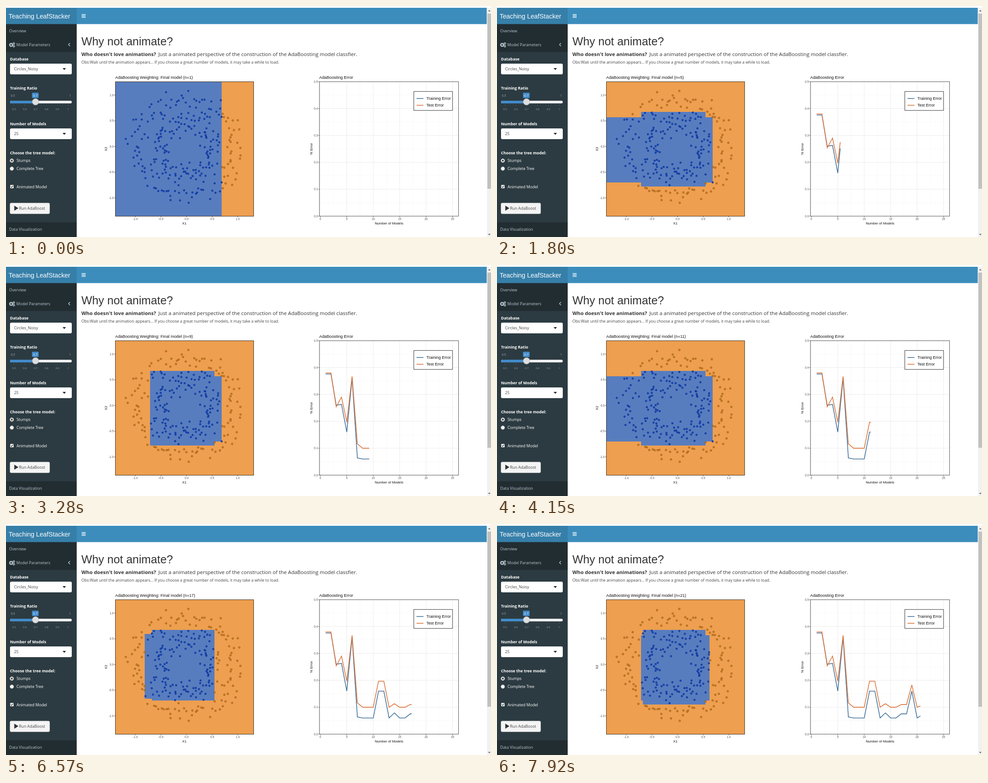
Write an HTML page that moves like this. It is 1084x517 px and loops after 8000 ms.

```html
<!DOCTYPE html>
<html lang="en">
<head>
<meta charset="utf-8">
<title>Boosting dashboard</title>
<style>
html, body { margin: 0; width: 100%; height: 100%; overflow: hidden; background: #fff; }
svg { display: block; width: 100vw; height: 100vh; }
text { font-family: "Open Sans", "Noto Sans", sans-serif; white-space: pre; }
.h { font-family: "Liberation Sans", Arial, sans-serif; }
</style>
</head>
<body>
<svg id="stage" viewBox="0 0 1084 517"></svg>
<script>
const stage = document.getElementById('stage');
const parts = [];
const add = s => parts.push(s);
const rect = (x, y, w, h, fill, more = '') =>
  add(`<rect x="${x}" y="${y}" width="${w}" height="${h}" fill="${fill}" ${more}/>`);
const path = (d, fill, more = '') => add(`<path d="${d}" fill="${fill}" ${more}/>`);
const line = (x1, y1, x2, y2, color, width = 1) =>
  path(`M${x1} ${y1}L${x2} ${y2}`, 'none', `stroke="${color}" stroke-width="${width}"`);
const circle = (x, y, r, fill, more = '') =>
  add(`<circle cx="${x}" cy="${y}" r="${r}" fill="${fill}" ${more}/>`);
const text = (x, y, size, fill, s, more = '') =>
  add(`<text x="${x}" y="${y}" font-size="${size}" fill="${fill}" ${more}>${s}</text>`);
const bold = 'font-weight="700"', sans = ' class="h"';
const middle = 'text-anchor="middle"', end = 'text-anchor="end"';

// Page frame
rect(0, 4, 158, 37, '#367fa9');
rect(158, 4, 916.5, 36.5, '#3c8dbc');
text(6, 27.5, 14.3, '#fff', 'Teaching LeafStacker', sans);
for (let i = 0; i < 3; i++) rect(169, 18.5 + i * 3.1, 9, 1.5, '#fff');
rect(1075, 4, 9, 513, '#f1f1f1');
rect(1076, 17, 8, 392, '#c1c1c1');
path('M1077.5 12l2.7-3 2.7 3z', '#606060');
path('M1077.5 510l2.7 3 2.7-3z', '#606060');

// Sidebar
rect(0, 40.5, 158, 476.5, '#222d32');
rect(0, 103, 158, 381, '#2c3b41');
const pale = '#b8c7ce', size = 8.85;
text(7, 59, size, pale, 'Overview');
text(23, 90, size, pale, 'Model Parameters');
text(7, 502.5, size, pale, 'Data Visualization');
const gear = (x, y, r) => {
  circle(x, y, r, 'none', `stroke="${pale}" stroke-width="${r * .75}"`);
  circle(x, y, r * 1.4, 'none', `stroke="${pale}" stroke-dasharray="${r * .55}"`);
};
gear(11.4, 87, 3);
gear(17.5, 84, 1.7);
gear(17.5, 90, 1.7);
path('M143 83l-3.4 3.5 3.4 3.5', 'none', `stroke="${pale}" stroke-width="1.4"`);

const label = (y, s) => text(9, y, 8.75, '#fff', s, bold);
const select = (y, s) => {
  rect(9, y, 138, 24, '#fff', 'rx="3"');
  text(18, y + 15.3, size, '#444', s);
  path(`M126.5 ${y + 10}h7.5l-3.75 4.2z`, '#222');
};
label(121.5, 'Database');
select(129, 'Circles_Noisy');
label(186.5, 'Training Ratio');
label(266.5, 'Number of Models');
select(274, '25');
label(331.5, 'Choose the tree model:');

text(11, 202.5, 6.2, '#b0b8bb', '0.5');
text(145, 202.5, 6.2, '#b0b8bb', '1', end);
rect(58, 194, 15, 12, '#428bca', 'rx="2"');
text(65.5, 202.7, 6.8, '#fff', '0.7', middle);
rect(9, 212, 138, 6, '#eeeef0', 'rx="3"');
rect(9, 212, 57, 6, '#428bca', 'rx="3"');
for (let i = 0; i <= 20; i++) {
  const x = 18 + i * 6.05;
  line(x, 220, x, i % 4 ? 221.5 : 223.5, '#66747a', .6);
  if (i % 4 === 0) text(x, 232.5, 5.8, '#9aa5a9', +(.5 + i / 40).toFixed(1), middle);
}
circle(66, 214.5, 7.3, '#dedede', 'stroke="#aaa" stroke-width=".6"');

const radio = (y, s) => {
  circle(13, y, 4.3, '#f1f1f1', 'stroke="#8d9598" stroke-width=".7"');
  text(23.5, y + 3.2, size, '#fff', s);
};
radio(346, 'Stumps');
circle(13, 346, 2.3, '#555');
radio(364, 'Complete Tree');
rect(9.5, 400.5, 7.5, 7.5, '#fff', 'rx="1"');
path('M11 404.3l1.8 1.9 3-4', 'none', 'stroke="#333" stroke-width="1.3"');
text(23.5, 407.5, size, '#fff', 'Animated Model');
rect(9, 441, 88.5, 24, '#f4f4f4', 'rx="2.5" stroke="#ddd" stroke-width=".7"');
path('M18.5 446.8l9.2 5.7-9.2 5.7z', '#333');
text(29, 456, size, '#444', 'Run AdaBoost');

// Heading
text(168.5, 88, 25.4, '#333', 'Why not animate?', sans);
text(168.5, 111.5, 11.2, '#333', "Who doesn't love animations?", bold);
text(340.5, 111.5, 11.5, '#333',
  'Just a animated perspective of the construction of the AdaBoosting model classfier.');
text(168.5, 129, 8.87, '#444',
  'Obs:Wait until the animation appears... If you choose a great number of models, it may take a while to load.');

// Model plot
const L = 244, T = 169, R = 554, B = 471, tick = '#4d4d4d';
add('<text id="title" class="h" x="244" y="163.3" font-size="9.28" fill="#111"></text>');
rect(L, T, R - L, B - T, '#ee9f4f');
add('<path id="area" fill="#587dbf" shape-rendering="crispEdges"/>');
rect(L + .5, T + .5, R - L - 1, B - T - 1, 'none', 'stroke="#4a3a28" stroke-width="1.1"');
const tickX = (x, s) => {
  line(x, 470.5, x, 473, '#333', .8);
  text(x, 479, 6.3, tick, s, middle + sans);
};
const tickY = (x, y, s) => {
  line(x - 2.5, y, x, y, '#333', .8);
  text(x - 3.5, y + 2.3, 6.3, tick, s, end + sans);
};
const axisX = (x, s) => text(x, 488.7, 7.8, '#111', s, middle + sans);
const axisY = (x, s) =>
  text(0, 0, 7.8, '#111', s, `${middle}${sans} transform="translate(${x} 320) rotate(-90)"`);
for (let i = -2; i <= 2; i++) {
  const s = (i / 2).toFixed(1);
  tickX(403.6 + i * 57.3, s);
  tickY(L, 314.5 - i * 57.5, s);
}
axisX(398.5, 'X1');
axisY(226, 'X2');

// Error plot
const errX = n => 702.6 + n * 11.82, errY = e => 470.3 - e * 602;
text(700, 163.3, 9.3, '#111', 'AdaBoosting Error', sans);
for (let i = 0; i <= 10; i++) {
  const x = errX(i * 2.5), y = errY(i * .05), minor = i % 2;
  const color = minor ? '#f5f5f5' : '#ebebeb', width = minor ? .6 : 1;
  line(x, T, x, 470, color, width);
  line(701, y, 1011, y, color, width);
  if (minor) continue;
  tickX(x, i * 2.5);
  tickY(700.5, y, (i * .05).toFixed(1));
}
rect(700.5, 169.5, 311, 300.8, 'none', 'stroke="#555"');
axisX(856, 'Number of Models');
axisY(684.5, '% Error');

const series = [
  { name: 'Training Error', key: 'train', color: '#41709a' },
  { name: 'Test Error', key: 'test', color: '#dc7238' }
];
for (const s of series)
  add(`<polyline class="curve" fill="none" stroke="${s.color}" stroke-width="1.6"/>`);
rect(911.5, 191.3, 86.5, 42.4, '#fff', 'stroke="#333"');
series.forEach((s, i) => {
  const y = 207 + i * 15.2;
  line(917.5, y, 933, y, s.color, 1.6);
  text(939.5, y + 3.2, 9, '#111', s.name, sans);
});

// Scatter: two noisy rings
const dots = [];
let seed = 11;
const random = () => (seed = seed * 16807 % 2147483647) / 2147483647;
const noise = () => random() + random() + random() - 1.5;
const ring = (count, radius, spread) => {
  for (let i = 0; i < count; i++) {
    const a = (i + random()) / count * 2 * Math.PI, r = radius + noise() * spread;
    dots.push([403 + r * Math.cos(a), 316 + r * Math.sin(a)]);
  }
};
ring(138, 62, 30);
ring(130, 111, 23);
for (const [x, y] of dots) circle(x.toFixed(1), y.toFixed(1), 1.85, 'none', 'class="dot" stroke-width=".9"');

// A classifier is a union of [left, top, right, bottom] areas; its shape decides its errors
const shape = (train, test, ...rects) => ({ train, test, rects });
const shapes = {
  right: shape(.376, .38, [L, T, 482, B]),
  deep: shape(.26, .254, [L, T, 482, 404]),
  corner: shape(.263, .29, [L, T, 482, 395]),
  left: shape(.36, .367, [322, T, R, B]),
  square: shape(.064, .116, [322, 246, 482, 404]),
  box: shape(.06, .1, [322, 237, 466, 404], [322, 249, 482, 395]),
  openLeft: shape(.16, .197, [322, 237, 466, 404], [L, 249, 482, 395]),
  openRight: shape(.16, .183, [322, 237, R, 395]),
  wide: shape(.079, .113, [310, 249, 482, 395], [338, 234, 478, 249]),
  notched: shape(.0755, .11, [326, 237, 466, 395], [310, 246, 326, 391]),
  slim: shape(.072, .107, [326, 237, 466, 404], [322, 249, 475, 395])
};
const models = ('right right deep corner openLeft left square box box box openLeft openLeft box ' +
  'wide box box notched notched openRight box slim').split(' ').map(name => shapes[name]);

stage.innerHTML = parts.join('');
const title = document.getElementById('title'), area = document.getElementById('area');
const curves = document.querySelectorAll('.curve'), marks = document.querySelectorAll('.dot');

function drawModel(n) {
  const { rects } = models[n - 1];
  title.textContent = `AdaBoosting Weighting: Final model (n=${n})`;
  area.setAttribute('d', rects.map(([l, t, r, b]) => `M${l} ${t}H${r}V${b}H${l}z`).join(''));
  dots.forEach(([x, y], i) => {
    const blue = rects.some(([l, t, r, b]) => x >= l && x <= r && y >= t && y <= b);
    marks[i].setAttribute('fill', blue ? '#1450d8' : '#e58f30');
    marks[i].setAttribute('stroke', blue ? '#0b2878' : '#7d4708');
  });
}
function drawCurves(p) {
  const n = Math.floor(p), f = p - n, next = models[n];
  series.forEach(({ key }, i) => {
    const points = models.slice(0, n).map((m, j) => [errX(j + 1), errY(m[key])]);
    const last = models[n - 1][key];
    if (f && next) points.push([errX(p), errY(last + (next[key] - last) * f)]);
    curves[i].setAttribute('points', points.length > 1 ? points.join(' ') : '');
  });
}

// The reveal advances in equal steps
const stepTime = 90, stepSize = .223;
let shownStep = -1, shownModel = 0;
function frame() {
  const step = Math.floor((performance.now() % 8000 + 60) / stepTime);
  if (step !== shownStep) {
    const p = 1 + step * stepSize, n = Math.round(p);
    if (n !== shownModel) drawModel(shownModel = n);
    drawCurves(p);
    shownStep = step;
  }
  requestAnimationFrame(frame);
}
frame();
</script>
</body>
</html>
```
